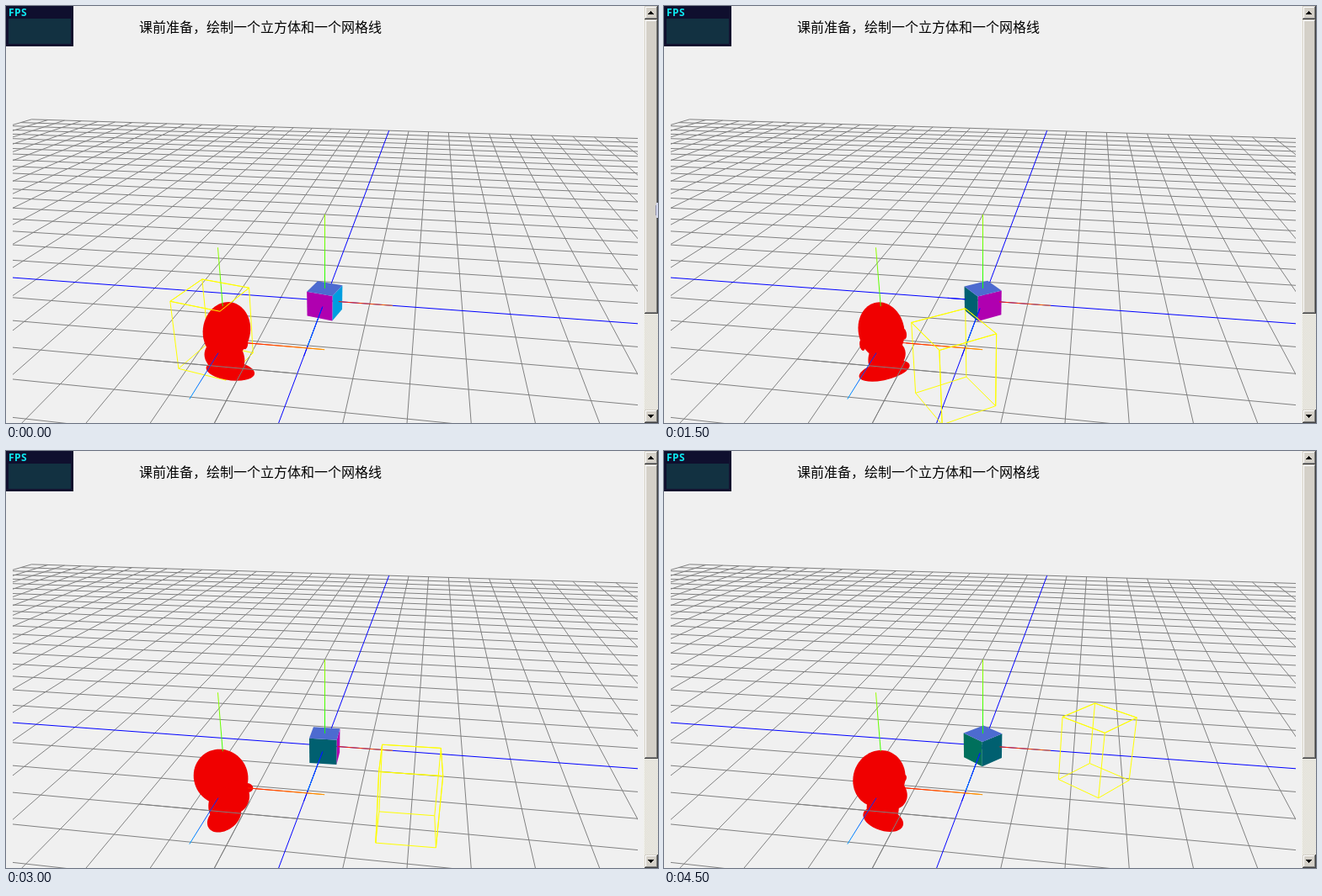
An HTML page with a canvas for the animation above (5000 ms loop, 774 px wide and 496 px high).

```html
<!DOCTYPE html>
<html lang="zh">
<head>
<meta charset="utf-8">
<title>Grid and cube</title>
<style>
html, body { margin: 0; width: 100%; height: 100%; overflow: hidden; background: #f0f0f0; }
canvas { position: absolute; left: 0; top: 0; }
div { position: absolute; white-space: nowrap; }
#title { left: 158px; top: 12px; font: 16px/24px "Noto Sans CJK SC", "Noto Sans CJK", sans-serif; color: #000; }
#fps { left: 3px; top: 0; font: bold 12px/15px "Noto Sans", sans-serif; letter-spacing: .5px; color: #0ee8f0; }
</style>
</head>
<body>
<canvas id="stage" width="774" height="496"></canvas>
<div id="title">课前准备，绘制一个立方体和一个网格线</div>
<div id="fps">FPS</div>
<script>
const W = 774, H = 496;
const view = { x: 8, y: 50, w: 742, h: 446 };
const stage = document.getElementById('stage').getContext('2d');
let ctx = stage;

// Camera at EYE, looking at the origin
const EYE = [100, 300, 600];
const FOCAL = 724.3, CX = 378.5, CY = 350.4;
const DIST = Math.hypot(...EYE), FLAT = Math.hypot(EYE[0], EYE[2]);
const sa = EYE[0] / FLAT, ca = EYE[2] / FLAT, se = EYE[1] / DIST, ce = FLAT / DIST;

const toCamera = ([x, y, z]) => [
  x * ca - z * sa,
  y * ce - (x * sa + z * ca) * se,
  DIST - y * se - (x * sa + z * ca) * ce
];
const toScreen = ([x, y, d]) => [CX + FOCAL * x / d, CY - FOCAL * y / d];
const project = p => toScreen(toCamera(p));
const mix = (a, b, t) => a + (b - a) * t;
const mixAll = (a, b, t) => a.map((v, i) => mix(v, b[i], t));
const add = (a, b) => a.map((v, i) => v + b[i]);
const cross = (a, b) => [0, 1, 2].map(i =>
  a[(i + 1) % 3] * b[(i + 2) % 3] - a[(i + 2) % 3] * b[(i + 1) % 3]);
const unit = a => a.map(v => v / Math.hypot(...a));
const spin = ([x, y, z], a) => [
  x * Math.cos(a) + z * Math.sin(a), y, z * Math.cos(a) - x * Math.sin(a)
];
const rgb = c => `rgb(${c.map(Math.round).join()})`;

function line(a, b, c0, c1 = c0) {
  const near = 10;
  let p = toCamera(a), q = toCamera(b);
  if (p[2] < near && q[2] < near) return;
  const cut = (u, v) => mixAll(u, v, (near - u[2]) / (v[2] - u[2]));
  if (p[2] < near) p = cut(p, q);
  else if (q[2] < near) q = cut(q, p);
  p = toScreen(p);
  q = toScreen(q);
  const paint = ctx.createLinearGradient(...p, ...q);
  paint.addColorStop(0, rgb(c0));
  paint.addColorStop(1, rgb(c1));
  ctx.strokeStyle = c0 === c1 ? rgb(c0) : paint;
  ctx.beginPath();
  ctx.moveTo(...p);
  ctx.lineTo(...q);
  ctx.stroke();
}

function polygon(points, color) {
  ctx.beginPath();
  points.forEach(p => ctx.lineTo(...project(p)));
  ctx.closePath();
  ctx.fillStyle = color;
  ctx.fill();
}

const GREY = [128, 128, 128], BLUE = [0, 0, 255], YELLOW = [255, 255, 0];
const AXES = [
  { dir: [1, 0, 0], from: [255, 0, 0], to: [255, 153, 0] },
  { dir: [0, 1, 0], from: [0, 255, 0], to: [153, 255, 0] },
  { dir: [0, 0, 1], from: [0, 0, 255], to: [0, 153, 255] }
];

function axis(i, origin, start, end = 100) {
  const { dir, from, to } = AXES[i];
  const at = s => add(origin, dir.map(v => v * s));
  line(at(start), at(end), mixAll(from, to, start / 100), mixAll(from, to, end / 100));
}

function grid() {
  for (let i = -1000; i <= 1000; i += 50) {
    if (i === 0) continue;
    line([i, 0, -1000], [i, 0, 1000], GREY);
    line([-1000, 0, i], [1000, 0, i], GREY);
  }
  line([0, 0, -1000], [0, 0, 1000], BLUE);
  line([-1000, 0, 0], [1000, 0, 0], BLUE);
}

function rect(x, y, w, h, color) {
  ctx.fillStyle = color;
  ctx.fillRect(x, y, w, h);
}

function bevel(y, h) {
  rect(758, y, 16, h, '#404040');
  rect(758, y, 15, h - 1, '#d4d0c8');
  rect(759, y + 1, 14, h - 2, '#808080');
  rect(759, y + 1, 13, h - 3, '#fff');
  rect(760, y + 2, 12, h - 4, '#d4d0c8');
}

function arrow(y, dir) {
  for (let i = 0; i < 4; i++) rect(765 - i, y + i * dir, 1 + 2 * i, 1, '#000');
}

function scrollbar() {
  rect(757, 0, 17, H, '#f0f0ea');
  for (let y = 366; y < 480; y++)
    for (let x = 758 + y % 2; x < W; x += 2) rect(x, y, 1, 1, '#dcd9d0');
  bevel(0, 16);
  bevel(16, 350);
  bevel(480, 16);
  arrow(6, 1);
  arrow(489, -1);
}

function handle() {
  rect(772, 234, 2, 18, '#d4d8ee');
  rect(771, 237, 1, 12, '#9090a8');
}

function clipView() {
  ctx.beginPath();
  ctx.rect(view.x, view.y, view.w, view.h);
  ctx.clip();
}

// Everything that stays still
const back = document.createElement('canvas');
back.width = W;
back.height = H;
ctx = back.getContext('2d');
rect(0, 0, W, H, '#f0f0f0');
rect(0, 0, 80, 48, '#0f0f2e');
rect(3, 15, 74, 30, '#123141');
scrollbar();
ctx.save();
clipView();
grid();
ctx.restore();
ctx = stage;

const CORNERS = [[-1, -1], [1, -1], [1, 1], [-1, 1]];
const SIDES = ['#00705c', '#009ee0', '#b000b0', '#006070'];

function cube(a) {
  const r = 15;
  const corner = (i, y) => spin([CORNERS[i % 4][0] * r, y, CORNERS[i % 4][1] * r], a);
  const normals = SIDES.map((_, i) => spin([0, 0, -1], a - i * Math.PI / 2));
  const seen = n => EYE[0] * n[0] + EYE[2] * n[2] > r;
  normals.forEach((n, i) => {
    if (seen(n)) polygon([corner(i, r), corner(i + 1, r), corner(i + 1, -r), corner(i, -r)], SIDES[i]);
  });
  polygon([0, 1, 2, 3].map(i => corner(i, r)), '#4d6bd0');

  // Lines leave the cube where they meet a visible side
  const exit = r / Math.max(Math.abs(Math.cos(a)), Math.abs(Math.sin(a)));
  const hit = x => normals.reduce((m, n) => n[0] * x > m[0] * x ? n : m);
  if (seen(hit(-1))) line([-exit, 0, 0], [-40, 0, 0], BLUE);
  axis(0, [0, 0, 0], seen(hit(1)) ? exit : 18.5, 75);
  line([0, 0, exit], [0, 0, 120], BLUE);
  axis(2, [0, 0, 0], exit);
  axis(1, [0, 0, 0], r);
}

const BOX = { x: -85.8, z: 94, rx: 28.3, rz: 28.7, top: 33.6, low: -44.7 };

// The second pass draws only the edges in front of the head
function box(a, frontOnly) {
  const at = (i, y) => {
    const [x, z] = CORNERS[i % 4];
    return spin([BOX.x + x * BOX.rx, y, BOX.z + z * BOX.rz], a);
  };
  for (let i = 0; i < 4; i++) {
    const top = at(i, BOX.top), low = at(i, BOX.low);
    line(top, at(i + 1, BOX.top), YELLOW);
    if (!frontOnly) line(low, at(i + 1, BOX.low), YELLOW);
    if (!frontOnly || toCamera(at(i, 0))[2] < 575) line(top, low, YELLOW);
  }
}

// The head faces +z and is a union of ellipsoids: centre c, radii r
const HEAD = [-84.4, -5.5, 95.6];
const PARTS = [
  { c: [0, 10, -4], r: [22, 29, 27] },    // skull
  { c: [0, -12, 9], r: [18, 16, 14] },    // jaw
  { c: [0, 0, 22], r: [3, 5, 6] },        // nose
  { c: [-22, 2, 0], r: [2.5, 6, 4] },     // ears
  { c: [22, 2, 0], r: [2.5, 6, 4] },
  { c: [0, -24, -3], r: [16, 20, 16] },   // neck
  { c: [0, -37, -4], r: [27, 4, 16] }     // shoulders
];

function ellipsoid({ c, r }, a) {
  const centre = add(HEAD, spin(c, a));
  const toEye = unit(EYE.map((v, i) => v - centre[i]));
  const right = unit(cross([0, 1, 0], toEye)), up = cross(toEye, right);
  const rim = [];
  for (let t = 0; t < 2 * Math.PI; t += Math.PI / 32) {
    const dir = right.map((v, i) => v * Math.cos(t) + up[i] * Math.sin(t));
    const n = spin(dir, -a).map((v, i) => v * r[i]);
    const p = unit(n).map((v, i) => v * r[i]);
    rim.push(add(centre, spin(p, a)));
  }
  polygon(rim, '#f00000');
}

function draw(k) {
  const turn = (-13 + 17.7 * k - 0.045 * k * k) * Math.PI / 180;
  ctx.drawImage(back, 0, 0);
  if (k === 0) handle();
  ctx.save();
  clipView();
  axis(0, HEAD, 10);
  cube(turn);
  box(turn, false);
  PARTS.forEach(part => ellipsoid(part, turn));
  // The ground lies in front of the lower part of the head
  line([-150, 0, 150], [0, 0, 150], GREY);
  line([-50, 0, 128], [-50, 0, 300], GREY);
  axis(0, HEAD, 23);
  axis(1, HEAD, 39);
  axis(2, HEAD, 23);
  box(turn, true);
  ctx.restore();
}

let shown = -1;
const begin = performance.now();
function tick() {
  const k = Math.floor((performance.now() - begin) % 5000 / 500);
  if (k !== shown) draw(shown = k);
  requestAnimationFrame(tick);
}
tick();
</script>
</body>
</html>
```
